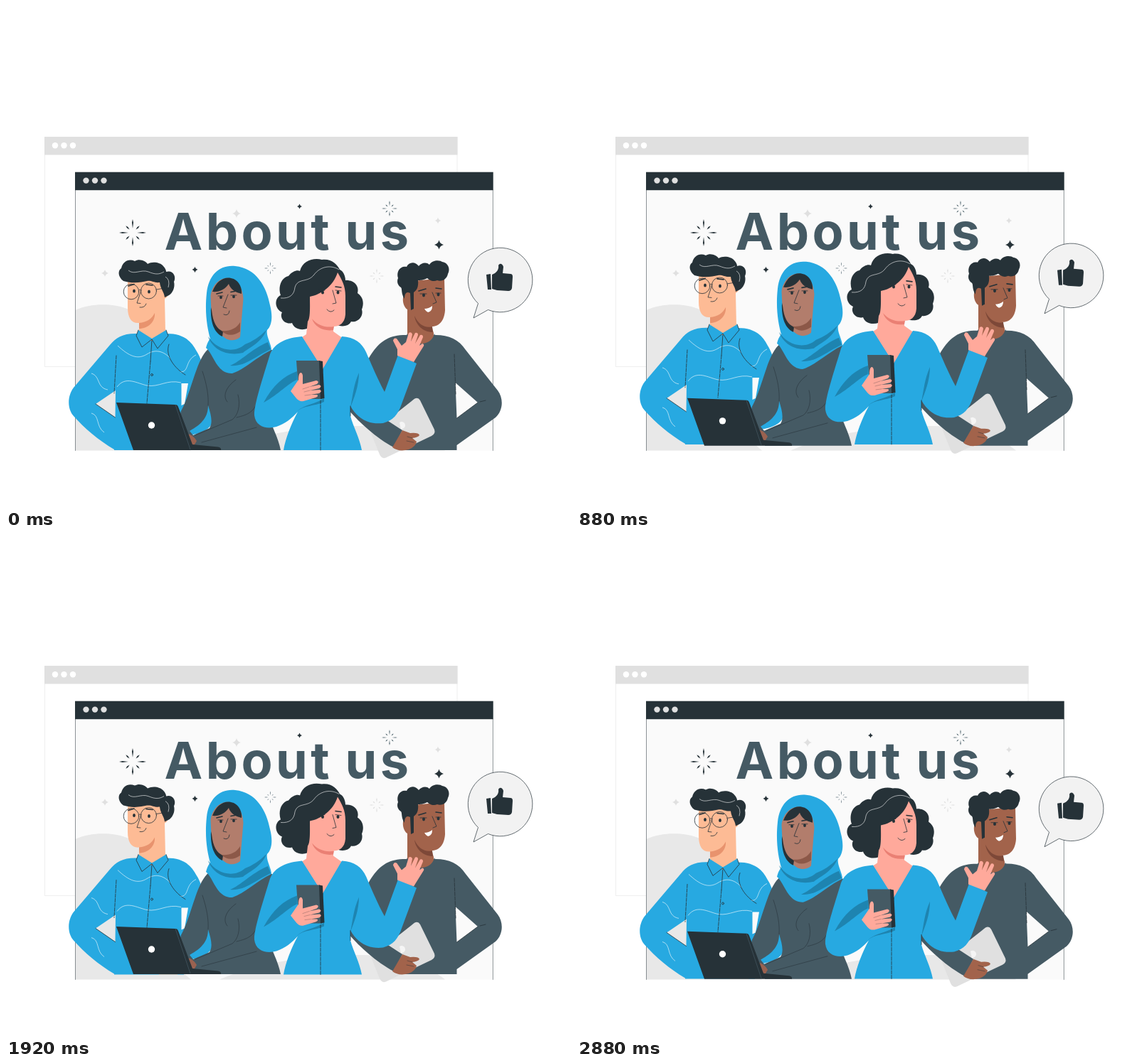
Recreate the animation shown at these times as an HTML page. Size 794x705 px, loop 2920 ms.

```html
<!DOCTYPE html>
<html lang="en">
<head>
<meta charset="utf-8">
<title>About us</title>
<style>
  html, body { margin: 0; width: 100%; height: 100%; overflow: hidden; background: #fff; }
  svg { display: block; width: 100%; height: 100%; }
  .dark { fill: #263238; }
  .slate { fill: #455a64; }
  .blue { fill: #27a9e1; }
  .fold { fill: #1e84b0; }
  .pale { fill: #e0e0e0; }
  .line { fill: none; stroke: #263238; stroke-width: .8; stroke-linecap: round; stroke-linejoin: round; }
  .brow { fill: none; stroke: #263238; stroke-width: 1.6; stroke-linecap: round; }
  .dash { stroke-dasharray: 5 1.5; }
  .white { fill: none; stroke: #fff; stroke-width: .7; opacity: .85; }
  .title { font: 700 72px Inter, sans-serif; letter-spacing: 4.4px; }
</style>
</head>
<body>
<svg viewBox="0 0 794 705">
  <!-- windows -->
  <rect x="54.5" y="184.5" width="579.5" height="323" fill="#fff" stroke="#ececec" stroke-width=".8"/>
  <rect class="pale" x="54" y="184" width="580.5" height="25.5"/>
  <g fill="#fff"><circle cx="69" cy="196.3" r="4.2"/><circle cx="81.5" cy="196.3" r="4.2"/><circle cx="94" cy="196.3" r="4.2"/></g>
  <rect x="97" y="259" width="587.5" height="366.5" fill="#fafafa"/>
  <path fill="#e8e8e8" d="M97.500 428 C118 418 150 418 170 426 C205 440 222 480 222 540 L230 600 L260 625.500 H97.500Z"/>
  <path fill="#e8e8e8" d="M300 625.500 C370 594 470 588 522 592 C565 597 595 608 617 625.500Z"/>
  <path class="line" opacity=".65" d="M97.500 259 V625.500 M684.300 259 V625.500"/>
  <rect class="dark" x="97" y="233.700" width="587.700" height="25.500"/>
  <g class="pale"><circle cx="112.500" cy="245.600" r="4.200"/><circle cx="125" cy="245.600" r="4.200"/><circle cx="137.500" cy="245.600" r="4.200"/></g>

  <g id="sparks"></g>
  <text class="title slate" x="222.500" y="342.500">About</text>
  <text class="title slate" x="476.500" y="342.500">us</text>

  <!-- man with glasses -->
  <g id="glasses">
    <path class="blue" fill-rule="evenodd" d="M186 461 C165 460 155 466 146 477 L95 537 C86 549 86 567 95 577 C110 594 130 611 152 624 V625 H250 L253 604 C270 604 290 596 291 582 C288 550 278 500 268 486 C260 470 248 461 226 461Z M154 541 L126 560 L153.500 579Z M246.500 531 L256 531 L251 560 L246.500 562Z"/>
    <path fill="#fdbb95" d="M213 619 Q217 614 226 615 L241 614 Q245 619 241 625 H215 Q212 622 213 619Z"/>
    <path fill="#fdbb95" d="M171 385 V424 C171 440 177 447 187 446 L187 458 C191 468 200 471 206 471 C216 468 222 464 224 458 L223 412 Q229 409 228 401 L222 398 L214 382Z"/>
    <path fill="#e8936e" d="M187 446 C198 445 205 440 209 432 C210 444 200 454 187 454Z"/>
    <path class="blue" d="M186 456 L205 468 L225 456 L228 464 L213 482 L205 469 L191 480 L183 464Z"/>
    <path class="line" d="M186 456 L183 464 L191 480 L205 469 L213 482 L228 464 L225 456"/>
    <path class="dark" d="M165 387 C157 381 157 372 162 369 C164 360 172 355 181 359 C188 355 196 359 199 363 C206 359 217 361 221 366 C224 369 225 372 225 374 C234 371 240 380 236 388 C238 396 234 404 229 407 L223 410 C222 402 217 398 216 389 C208 390 205 386 198 387 C190 389 178 391 165 387Z"/>
    <path class="white" opacity=".6" d="M172 372 C180 379 190 370 200 374 S215 378 222 374 M224 381 Q231 385 228 396"/>
    <g class="line"><circle cx="176" cy="402" r="10.800"/><circle cx="200.500" cy="401" r="11"/><path d="M187 400 Q188 398 189.500 400 M211 399 L223 397"/></g>
    <ellipse class="dark" cx="180" cy="401" rx="1.900" ry="2.500"/><ellipse class="dark" cx="201" cy="402" rx="1.900" ry="2.500"/>
    <path class="brow" d="M172 394 L180 391.500 M197 392 L206 393"/>
    <path class="line" d="M190 400 L184 418 L189 418.500 M188 424 Q195 425 197 419"/>
    <path class="white" d="M157 478 C173 493 185 498 198 490 C212 481 224 488 231 496 M156 536 C168 520 184 531 198 534 C215 537 226 525 246 530 M120 517 C133 521 127 537 143 540 M120 573 C132 576 126 592 138 600 M245 515 C258 515 251 499 267 491"/>
    <path class="line" d="M229 476 C223 492 237 510 252 519 M126 560 L153.500 579 M205 470 L203 500"/>
    <path class="line dash" d="M203 500 L198 559 M155 492 L152 545"/>
    <circle class="line" cx="205" cy="519" r="1.500"/>
  </g>

  <!-- woman with headscarf and laptop -->
  <g class="slow">
    <path class="slate" fill-rule="evenodd" d="M286 481 C267 496 262 540 246 570 C242 582 248 600 262 608 L264 625 H386 C383 608 372 588 366 570 L374 484 C350 480 310 480 286 481Z M284 562 C284 578 276 588 258 598 L263 604 L286 594 C291 586 288 575 284 562Z"/>
    <path class="line" opacity=".7" d="M276 514 C282 532 285 548 284 562 M323 526 C309 536 304 549 311 557 M326 547 C330 562 326 576 318 582 L266 604 M357 546 C351 572 340 575 324 579 M275 614 L352 593"/>
    <path class="blue" d="M322 366 C300 364 285 378 282 404 C279 432 283 454 287 468 Q283 473 281 481 C292 490 296 518 318 517 C336 511 352 494 373 484 C373 476 365 464 367 456 C374 449 375 436 371 421 C366 395 352 369 322 366Z"/>
    <path class="fold" d="M284 465 C296 484 320 490 336 476 Q352 470 366 456 C360 473 340 482 333 488 C312 493 291 485 284 465Z M315 506 C330 500 343 484 368 473 L372 483 C350 493 336 508 315 506Z"/>
    <path fill="#b27d6c" d="M287.500 408 C290 390 303 381 314 383 C325 385 333 396 333.500 412 L329 466 C320 473 310 471 303 463 C293 454 289 445 288.500 430Z"/>
    <path class="dark" d="M289 428 C291 446 296 454 305 458 L304 465 C293 460 287 446 288 424Z"/>
    <path fill="#8c5848" d="M303 457 C314 458 324 454 329 445 L329 458 C320 465 309 464 303 457Z"/>
    <path class="dark" d="M290 402 C296 386 308 379 320 384 C328 388 332 397 331 405 C322 403 315 398 313 391 C308 399 299 403 290 402Z"/>
    <path class="brow" d="M296 405 L304 403 M316 402.500 L324 401"/>
    <ellipse class="dark" cx="302" cy="410" rx="1.900" ry="2.300"/><ellipse class="dark" cx="320" cy="409" rx="1.900" ry="2.300"/>
    <path class="line" d="M298 408 L305 408 M316 407 L324 407 M312 406 L305 424 L310 425 M306 434 Q313 437 314 429"/>
    <path fill="#9a6250" d="M253 602 Q262 602 268 612 L264 619 H256Z"/>
    <path class="dark" d="M155 558 L238 561 Q241 561 242 564 L262 617 L298 620.500 Q303 621.500 302 625 H179Z"/>
    <path d="M238 561 L259 624" fill="none" stroke="#455a64" stroke-width=".7"/>
    <circle cx="204.500" cy="590" r="4.700" fill="#fff"/>
  </g>

  <!-- man with tablet -->
  <g class="slow">
    <path class="slate" fill-rule="evenodd" d="M566 463 C540 462 528 470 516 486 C505 501 492 530 484 555 L540 580 L560 625 H633.500 V618 L688 579 C698 570 700 553 691 541 L646 484 C636 468 620 462 600 463Z M631.500 530 L663 558 L633.500 580Z"/>
    <path class="line dash" d="M630 490 L632 546"/>
    <path class="line" d="M663 558 L633.500 580 M666 557 L674 555"/>
    <path class="pale" d="M513 601 L570 556 Q578 548 582 555 L602 596 Q604 602 598 605 L534 635.500 Q528 638 525 631Z"/>
    <path fill="#f5f5f5" d="M553 586 a5 5 0 0 1 6 8 l-4 2Z"/>
    <path class="slate" d="M483 545 C500 562 535 582 557 597 L545 621 C525 611 500 590 481 568Z"/>
    <path fill="#a2634b" d="M557 597 L568 601 Q580 600 581 604 Q579 607 571 608 L577 613 Q576 620 566 624 Q552 628 543 621Z"/>
    <path class="line" opacity=".6" d="M571 608 L564 606 M573 614 L563 612"/>
    <path fill="#a2634b" d="M571 387 L616 383 L617 428 C616 444 608 451 598 451 L601 460 V468 C592 480 572 480 564 467 V427 C556 422 555 402 566 402Z"/>
    <path fill="#7d4838" d="M574 436 C580 449 590 454 599 451 L600 459 C586 459 576 449 574 436Z"/>
    <path class="slate" d="M564 461 C568 480 598 480 602 461 L606 470 L584 486 L560 470Z"/>
    <path class="dark" d="M551 383 C548 374 554 365 563 367 C566 360 575 359 580 366 C584 361 591 360 595 364 C600 356 611 358 613 360 C621 361 625 370 621 377 C619 386 611 388 606 386 C600 389 594 385 592 383 C586 386 582 386 579 386 C580 396 577 400 573 403 L573 426 L569 428 L568 404 C561 400 560 408 560 412 C555 405 557 398 555 396 C550 393 549 387 551 383Z"/>
    <path class="brow" d="M580 401 L590 398 M604 397 L612 398"/>
    <ellipse class="dark" cx="587" cy="407" rx="2" ry="2.400"/><ellipse class="dark" cx="607.500" cy="406" rx="2" ry="2.400"/>
    <path class="line" d="M582 405 L591 405 M604 404 L611 404 M599 403 L605 417 L600 419"/>
    <path fill="#fff" d="M588 426 Q594 426 599 422 Q599 430 593 431 Q590 430 588 426Z"/>
  </g>

  <!-- woman with phone -->
  <g id="phone">
    <path class="dark" d="M386 407 C382 395 387 382 397 380 C402 373 410 371 413 373 C417 358 432 354 444 357 C457 355 466 364 469 371 C474 373 477 380 477 386 C489 385 497 394 494 404 C503 410 503 420 500 427 C503 437 494 446 485 444 C481 452 469 452 462 447 L431 449 C421 459 405 456 402 446 C391 449 384 438 388 431 C377 426 377 411 386 407Z"/>
    <path class="white" d="M386 411 C399 412 405 406 406 396 C410 382 424 390 433 378 C442 366 457 364 468 371"/>
    <path fill="#ffa99b" d="M466 375 C472 385 477 394 477 408 V434 C476 447 468 451 460 451 L460 458 L474 468 L445 516 L413 468 L422 462 L424 444 C428 440 427 420 427 409 C443 406 460 394 466 375Z"/>
    <path fill="#ea8074" d="M430 440 C438 450 450 453 461 451 L460 456 C446 458 434 452 430 440Z"/>
    <path class="blue" d="M416 465 C395 467 378 473 371 490 C362 520 348 562 349 576 C351 592 366 596 380 592 C392 588 402 580 410 571 C400 590 393 608 390 625 H500 C497 608 488 592 484 577 V563 C495 582 510 589 530 587 C544 583 551 575 556 560 L577 503 L551 491 L532 543 C522 525 510 496 506 487 C500 474 490 466 472 465 L445 511Z"/>
    <path class="fold" d="M362 558 C375 534 391 520 409 514 V526 C396 531 384 546 362 558Z M408 571 C420 560 436 560 447 552 L447 557 C432 564 420 561 408 571Z M484 565 C488 545 488 535 496 516 C496 535 489 552 484 565Z"/>
    <path class="line dash" d="M442 555 V625"/>
    <path class="line" d="M445 511 L444 520 M484 563 L484 577"/>
    <path class="slate" d="M408 499 H441 L444 553 H412Z"/>
    <path class="dark" d="M440 499 L445 500 L447.500 552 L442 553Z"/>
    <path fill="#ffa99b" d="M400 542 L411 526 C411 514 416 514 417 520 L417 532 L436 527 Q441 528 437 532 L426 536 L440 533 Q445 535 440 538 L427 541 L441 540 Q445 542 440 545 L428 547 L437 547 Q440 549 435 551 L418 556 Q412 557 408 552Z"/>
    <path class="line" opacity=".35" d="M426 536 L417 539 M427 541 L419 543 M428 547 L420 548"/>
    <path fill="#ffa99b" d="M550 492 L550 483 L544 471 Q545 466 549 468 L556 478 L562 473 L566 460 Q570 458 571 462 L569 472 L575 460 Q579 459 579 463 L575 475 L582 463 Q586 462 586 466 L581 478 L585 475 Q589 476 586 480 L576 496 L573 501Z"/>
    <path class="brow" d="M440 398 L448 395 M463 395 L471 396"/>
    <ellipse class="dark" cx="445" cy="403" rx="2" ry="2.500"/><ellipse class="dark" cx="466.500" cy="403" rx="2" ry="2.500"/>
    <path class="line" d="M440 401 L448 400 M463 400 L471 401 M459 400 L464 418 L459 419 M451 427 Q456 433 461 428"/>
  </g>

  <!-- speech bubble -->
  <g class="slow">
    <path d="M663.500 418.500 A45.300 45.300 0 1 1 677.500 427.500 L657 439Z" fill="#f2f2f2" stroke="#263238" stroke-width=".7"/>
    <path class="dark" d="M675 378 L681 377 L682 399 L677 399Z M683 378 C689 376 693 371 692 365 C694 361 698 363 699 367 L698 376 L709 377 Q712 377 712 381 L711 397 Q710 401 706 401 L690 400 L683 398Z"/>
  </g>
</svg>
<script>
const LOOP = 2920, STEP = 40, LIFT = 10.2;
const $ = s => [...document.querySelectorAll(s)];

// thin tapered rays around an empty centre
function burst(x, y, r, color) {
  let out = '';
  for (let i = 0; i < 8; i++) {
    const far = i % 2 ? r * .72 : r, near = r * .33, w = r * .055;
    out += `<path fill="${color}" transform="translate(${x} ${y}) rotate(${i * 45})" d="M${near} 0 L${far * .75} ${-w} L${far} 0 L${far * .75} ${w}Z"/>`;
  }
  return out;
}

const star = (x, y, r, color) =>
  `<path fill="${color}" transform="translate(${x} ${y}) scale(${r})" d="M0 -1 Q.2 -.2 1 0 Q.2 .2 0 1 Q-.2 .2 -1 0 Q-.2 -.2 0 -1Z"/>`;

const dark = '#263238', pale = '#e0e0e0';
$('#sparks')[0].innerHTML =
  burst(178, 319, 19, dark) + burst(539, 285, 11, '#455a64') +
  burst(371.5, 369, 8.5, '#667780') + burst(521, 380, 10.5, '#d8d8d8') +
  star(324, 292, 6, pale) + star(412.5, 282, 3.5, dark) + star(265.500, 371, 4.200, dark) +
  star(607, 302, 4.500, pale) + star(608.500, 336, 6.500, dark) + star(139, 376, 5, pale);

const slow = $('.slow'), fast = $('#glasses, #phone');

// linear up and down within one period
const bob = (t, period) => -LIFT * (1 - Math.abs(1 - 2 * (t % period) / period));
const lift = (parts, y) => parts.forEach(p => p.setAttribute('transform', `translate(0 ${y.toFixed(2)})`));

function draw(ms) {
  let t = Math.floor((ms % LOOP) / STEP) * STEP;
  if (t < 2 * STEP) t = 0;
  lift(slow, bob(t, LOOP));
  lift(fast, bob(t, LOOP / 2));
}

const start = performance.now();
function tick() {
  draw(performance.now() - start);
  requestAnimationFrame(tick);
}
tick();
</script>
</body>
</html>
```
